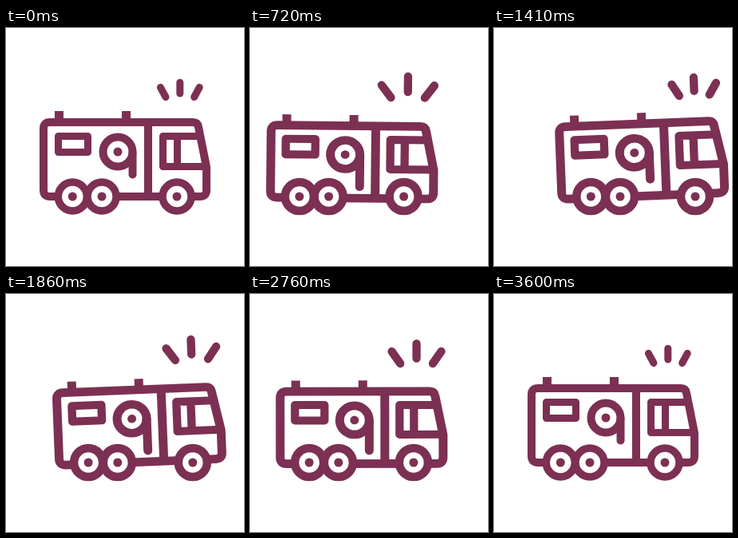
An HTML page that plays this animation: 298x298 px, repeating every 3630 ms.

```html
<!DOCTYPE html>
<html lang="en">
<head>
<meta charset="utf-8">
<title>Fire truck</title>
<style>
  html, body { margin: 0; width: 100%; height: 100%; overflow: hidden; background: #fff; }
  svg { display: block; width: 100vw; height: 100vh; --bold: 0; }
  .line { fill: none; stroke: #7c3053; stroke-width: calc(10px + var(--bold) * 1px); stroke-linejoin: round; }
  .thin { stroke-width: calc(9px + var(--bold) * 1.3px); }
  .round { stroke-linecap: round; }
  .dot { fill: #7c3053; }
  .wheel { fill: #fff; stroke-width: calc(9.5px + var(--bold) * 1px); }
</style>
</head>
<body>
<svg id="stage" viewBox="0 0 298 298">
  <g id="truck">
    <g id="tilt">
      <g id="body">
        <path class="dot" d="M61 104h11v10h-11zM145 104h11v10h-11z"/>
        <path class="line" d="M55 118H234Q240 118 241 124L251 174V203Q251 211 243 211H55Q47 211 47 203V126Q47 118 55 118Z"/>
        <path class="line" d="M178 118V211"/>
        <path class="line thin" d="M65.500 135.500H102.500V155.500H65.500Z"/>
        <path class="line thin" d="M243 135.500H196.500V173.500H250M214.500 136V173"/>
        <circle class="line" cx="140" cy="155" r="18.500"/>
        <circle class="dot" cx="140" cy="155" r="5.500"/>
        <path class="line round" id="hose"/>
      </g>
      <path class="line thin round" id="rays"/>
    </g>
    <g id="wheels"></g>
  </g>
</svg>
<script>
const LOOP = 3630, STEP = 30, PULSE = 540, PULSE_END = 6 * PULSE, HOSE = 1200;
const GROUND = 211;
const $ = id => document.getElementById(id);

// Turning points as [time, value], joined by sine easing
const SHIFT = [[0, 0], [915, -24], [1440, 38.5], [2460, -13], [3330, 1.5], [3600, 0]];
const TILT = [[0, 0], [500, .9], [1050, 0], [1440, -2.3], [2400, -2.3], [2800, 0]];
const MOVING = [[0, 0], [90, 1], [3270, 1], [3500, 0]];

const wave = u => (1 - Math.cos(Math.PI * u)) / 2;

function ease(keys, t) {
  const i = keys.findIndex(([time]) => time > t);
  if (i < 0) return keys[keys.length - 1][1];
  const [t0, a] = keys[i - 1], [t1, b] = keys[i];
  return a + (b - a) * wave((t - t0) / (t1 - t0));
}

// Three rays fan out from a point above the cab; each pulse is a damped swing
function rayPath(t, moving) {
  const p = t < PULSE_END ? t % PULSE / PULSE : 0;
  const flare = 1.9 * Math.sin(1.5 * Math.PI * p) * (1 - p);
  const spread = 28.4 + 2 * moving + 5.6 * flare;
  const inner = 37.5 - .9 * moving - 1.4 * flare;
  const outer = 51.3 + 1.7 * moving + flare;
  const focus = 119.5 - 5.8 * flare;
  return [-spread, 0, spread].map(deg => {
    const a = deg * Math.PI / 180;
    const at = r => `${217.8 + r * Math.sin(a)} ${focus - r * Math.cos(a)}`;
    return `M${at(inner)}L${at(outer)}`;
  }).join("");
}

function draw(t) {
  const moving = ease(MOVING, t);
  const squash = 1 - .027 * moving;
  const drop = wave(2 * t / HOSE) ** .6;
  $("stage").style.setProperty("--bold", moving);
  $("truck").setAttribute("transform", `translate(${ease(SHIFT, t)} 0)`);
  $("tilt").setAttribute("transform", `translate(0 ${1.5 * moving}) rotate(${ease(TILT, t)} 95 ${GROUND})`);
  $("body").setAttribute("transform", `translate(0 ${GROUND * (1 - squash)}) scale(1 ${squash})`);
  $("hose").setAttribute("d", `M158.500 156V${183.5 + 13.5 * drop}`);
  $("rays").setAttribute("d", rayPath(t, moving));
}

$("wheels").innerHTML = [83.3, 120, 214].map(x =>
  `<circle class="line wheel" cx="${x}" cy="${GROUND}" r="18"/><circle class="dot" cx="${x}" cy="${GROUND}" r="5.500"/>`
).join("");

const start = performance.now();
function tick() {
  const t = (performance.now() - start) % LOOP;
  draw(Math.floor(t / STEP) * STEP);
  requestAnimationFrame(tick);
}
draw(0);
requestAnimationFrame(tick);
</script>
</body>
</html>
```
